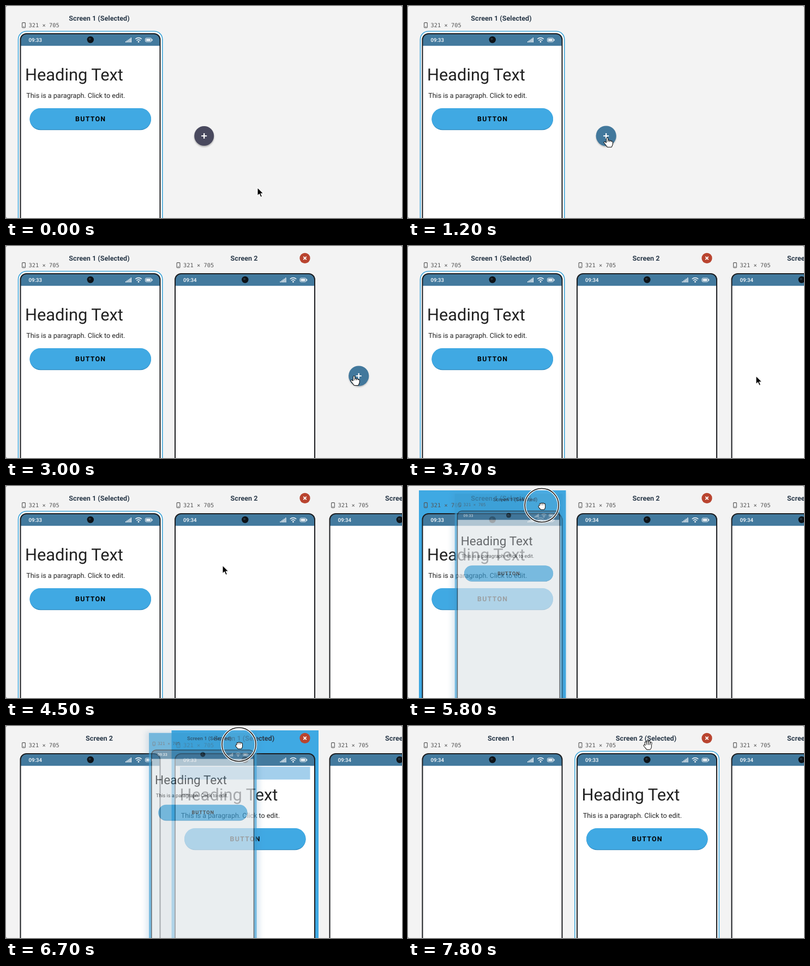
Write an HTML page that moves like this. It is 726x390 px and loops after 7.9 s.

```html
<!DOCTYPE html>
<html lang="en">
<head>
<meta charset="utf-8">
<title>Screen designer</title>
<style>
html, body { margin: 0; width: 100%; height: 100%; overflow: hidden; background: #f3f3f3; }
svg { display: block; width: 726px; height: 390px; }
text { font-family: Roboto, sans-serif; text-rendering: geometricPrecision; }
.title { font-weight: 700; font-size: 12.6px; fill: #2b3a4a; text-anchor: middle; }
.size { font-family: "DejaVu Sans Mono", monospace; font-size: 10.35px; fill: #555; }
.time { font-weight: 500; font-size: 9.6px; fill: #fff; }
.heading { font-size: 30.8px; fill: #212121; }
.para { font-size: 12.55px; fill: #212121; }
.btn { font-weight: 700; font-size: 12.4px; letter-spacing: 1.3px; text-anchor: middle; }
#ghostSlot { opacity: .63; filter: brightness(.94); }
</style>
</head>
<body>
<svg id="stage" viewBox="0 0 726 390"></svg>
<script>
const LOOP = 7900, STEP = 100, PITCH = 283.5, GHOST = 0.733;
const ADD2 = 1500, ADD3 = 3200, PRESS = 5400, DRAG = 5600, SWAP = 6500, DROP = 7200;

const icons = `
  <g fill="#fff">
    ${[0, 1, 2, 3, 4].map(i => `<rect x="${219 + i * 2.4}" y="${65 - i * 1.7}" width="1.4" height="${2 + i * 1.7}"/>`).join('')}
    <circle cx="243" cy="65.8" r="1.4"/>
    <rect x="257" y="60.8" width="8" height="3.4" rx=".6"/>
    <rect x="267.4" y="60.8" width="1.2" height="3.4"/>
  </g>
  <g fill="none" stroke="#fff" stroke-width="1.3">
    <path d="M237.2 60.8q5.8-4.6 11.6 0M239.4 63.4q3.6-2.8 7.2 0"/>
    <rect x="255.6" y="59.2" width="11" height="6.6" rx="1.6" stroke-width="1"/>
  </g>`;

const slotMarkup = (titleX, closable) => `
  <rect data-k="hilite" x="20" y="8" width="269.5" height="620" fill="#3fa9e3"/>
  <rect data-k="ring" x="22.5" y="46.5" width="264.3" height="575" rx="15" fill="#fff" stroke="#3fa5d9" stroke-width="1.6"/>
  <text data-k="title" class="title" x="${titleX}" y="26.6"></text>
  <rect x="29.6" y="30.6" width="5.8" height="9.4" rx="1.2" fill="none" stroke="#555" stroke-width="1.1"/>
  <path d="M31.4 38.2h2.2" stroke="#555"/>
  <text class="size" x="41.6" y="39">321 × 705</text>
  <rect x="26.5" y="51" width="256" height="564" rx="11" fill="#fff"/>
  <path d="M26.5 73.2V62a11 11 0 0 1 11-11H271.5a11 11 0 0 1 11 11V73.2z" fill="#437a9e"/>
  <rect x="26.5" y="51" width="256" height="564" rx="11" fill="none" stroke="#1b1d20" stroke-width="2"/>
  <text data-k="time" class="time" x="41.6" y="65.6"></text>
  <circle cx="154.8" cy="62" r="6.2" fill="#0d1318"/>
  <circle cx="153.6" cy="60.6" r="2.2" fill="#28343d"/>
  ${icons}
  <rect data-k="zone" x="35.5" y="75" width="238.5" height="23.5" fill="#a3cfec"/>
  <g data-k="form">
    <text class="heading" x="35" y="136.6">Heading Text</text>
    <text class="para" x="37.2" y="169">This is a paragraph. Click to edit.</text>
    <rect x="43.5" y="188.6" width="222.5" height="39.6" rx="19.8" fill="#2f8ac0"/>
    <rect x="43.5" y="188" width="222.5" height="39" rx="19.5" fill="#40a9e3"/>
    <text class="btn" x="155.2" y="211.6">BUTTON</text>
  </g>
  ${closable ? `<circle cx="264.5" cy="22.4" r="9.6" fill="#b9442f"/>
  <path d="M261.8 19.7l5.4 5.4m0-5.4l-5.4 5.4" stroke="#fff" stroke-width="1.8"/>` : ''}`;

const hands = {
  point: 'M0 1.5V9M3 6V9M6 6.8V9M8.6 8V10M-4.5 9L-1.5 12M0 9H8.6V12L7 16H1L-2.5 11.5Z',
  open: 'M-3.4 1L-4.6-4.4M-.9 0L-1.4-6.4M2 0L2.2-6M4.8 1L5.6-3.8M-4 4L-6.6 1M-3.4 1H4.8V4L3.4 7H-1.6L-4 4Z',
  closed: 'M-2.6 1V-2M0 1V-2.8M2.6 1V-2.6M5 1V-1.6M-3.4 4L-4.6 2.2M-2.6 1H5V4L3.8 6.6H-1L-3.4 4Z'
};
const handMarkup = ([name, d]) => `<g data-k="${name}" stroke-linecap="round" stroke-linejoin="round">
  <path d="${d}" fill="#111" stroke="#111" stroke-width="4"/>
  <path d="${d}" fill="#fff" stroke="#fff" stroke-width="2"/></g>`;

const stage = document.getElementById('stage');
stage.innerHTML = `
  <defs>
    <filter id="soft" x="-20%" y="-20%" width="140%" height="140%"><feGaussianBlur stdDeviation="6"/></filter>
    <filter id="shade" x="-30%" y="-30%" width="160%" height="160%"><feGaussianBlur stdDeviation="1.6"/></filter>
  </defs>
  <rect width="726" height="390" fill="#8a8a8a"/>
  <rect width="726" height="390" rx="3" fill="#f3f3f3"/>
  <g id="plus">
    <circle cy="2" r="18" fill="#000" opacity=".3" filter="url(#shade)"/>
    <circle data-k="disc"/>
    <path d="M-5 0H5M0-5V5" stroke="#fff" stroke-width="2.2"/>
  </g>
  <g id="slot0">${slotMarkup(171, false)}</g>
  <g id="slot1">${slotMarkup(153, true)}</g>
  <g id="slot2">${slotMarkup(153, true)}</g>
  <g id="ghost">
    <rect x="12" y="4" width="286" height="628" fill="#4a86b4" opacity=".16" filter="url(#soft)"/>
    <g id="ghostSlot">${slotMarkup(171, false)}</g>
  </g>
  <g id="cursor">
    <g data-k="press" fill="none">
      <circle r="31" fill="#fff" fill-opacity=".06" stroke="#fff" stroke-width="4.2"/>
      <circle r="31" stroke="#151515" stroke-width="1.6"/>
    </g>
    <path data-k="arrow" d="M0 0V15.2L3.5 12L6 17.6L8.6 16.5L6.2 11H11Z" fill="#000" stroke="#fff" stroke-width="1.1"/>
    ${Object.entries(hands).map(handMarkup).join('')}
  </g>`;

// Collect the keyed parts of a group.
function parts(id) {
  const root = document.getElementById(id), out = { root };
  root.querySelectorAll('[data-k]').forEach(el => out[el.dataset.k] = el);
  return out;
}
const slots = ['slot0', 'slot1', 'slot2'].map(parts);
const ghost = parts('ghost'), plus = parts('plus'), cursor = parts('cursor');

const show = (el, on) => el.style.display = on ? '' : 'none';
const move = (el, x, y, more = '') => el.setAttribute('transform', `translate(${x} ${y}) ${more}`);
const clamp = v => Math.max(0, Math.min(1, v));

const linear = p => p, easeIn = p => p * p, easeOut = p => p * (2 - p), smooth = p => p * p * (3 - 2 * p);

// time, x, y, easing used to get there
const path = [
  [500, 461, 334, linear],
  [1250, 364, 241, smooth],
  [2100, 364, 241, linear],
  [2900, 638, 239, smooth],
  [3800, 638, 239, linear],
  [4500, 397, 146, smooth],
  [5200, 237, 36, smooth],
  [5500, 237, 36, linear],
  [6300, 295, 32, easeIn],
  [6700, 427, 34, linear],
  [7000, 440, 35, easeOut]
];

function pointer(t) {
  const i = path.findIndex(k => k[0] > t);
  if (i < 0) return path[path.length - 1].slice(1, 3);
  if (i === 0) return path[0].slice(1, 3);
  const a = path[i - 1], b = path[i], p = b[3]((t - a[0]) / (b[0] - a[0]));
  return [a[1] + (b[1] - a[1]) * p, a[2] + (b[2] - a[2]) * p];
}

function setSlot(s, { title, form = false, drag = false, zone = false }) {
  s.title.textContent = title;
  s.time.textContent = form ? '09:33' : '09:34';
  show(s.form, form);
  show(s.ring, form && !drag);
  show(s.hilite, drag);
  show(s.zone, zone);
}

function fadeIn(s, i, t, start) {
  const p = clamp((t - start) / 500), k = 0.96 + 0.04 * p;
  show(s.root, t >= start);
  s.root.setAttribute('opacity', p);
  move(s.root, i * PITCH + 154.5 * (1 - k), 170 * (1 - k), `scale(${k})`);
}

function render(t) {
  const dragging = t >= DRAG && t < DROP, swapped = t >= SWAP, dropped = t >= DROP;
  const form = {
    title: `Screen ${dropped ? 2 : 1} (Selected)`, form: true,
    drag: dragging, zone: dragging && swapped
  };
  const blank = { title: `Screen ${dropped ? 1 : 2}` };
  setSlot(slots[0], swapped ? blank : form);
  setSlot(slots[1], swapped ? form : blank);
  setSlot(slots[2], { title: 'Screen 3' });
  fadeIn(slots[1], 1, t, ADD2);
  fadeIn(slots[2], 2, t, ADD3);

  const [x, y] = pointer(t);
  const plusX = 363.2 + PITCH * ((t >= ADD2) + (t >= ADD3));
  const hover = Math.hypot(x - plusX, y - 239) < 18;
  move(plus.root, plusX, 239);
  plus.disc.setAttribute('r', hover ? 18.6 : 18);
  plus.disc.setAttribute('fill', hover ? '#42789c' : '#49495e');

  show(ghost.root, dragging);
  const [gx, gy] = pointer(t - 20);
  move(ghost.root, gx - 173, gy - 27, `scale(${GHOST})`);

  const held = t >= PRESS && t < DROP;
  const kind = held ? 'closed' : t >= 5100 ? 'open' : hover ? 'point' : 'arrow';
  for (const k of ['arrow', 'point', 'open', 'closed']) show(cursor[k], k === kind);
  const click = [ADD2, ADD3].some(c => t >= c - STEP && t < c);
  show(cursor.press, held || click);
  move(cursor.root, x, y);
}

setSlot(ghost, { title: 'Screen 1 (Selected)', form: true, drag: true });

function tick() {
  const t = performance.now() % LOOP;
  render(Math.floor(t / STEP) * STEP);
  requestAnimationFrame(tick);
}
tick();
</script>
</body>
</html>
```
